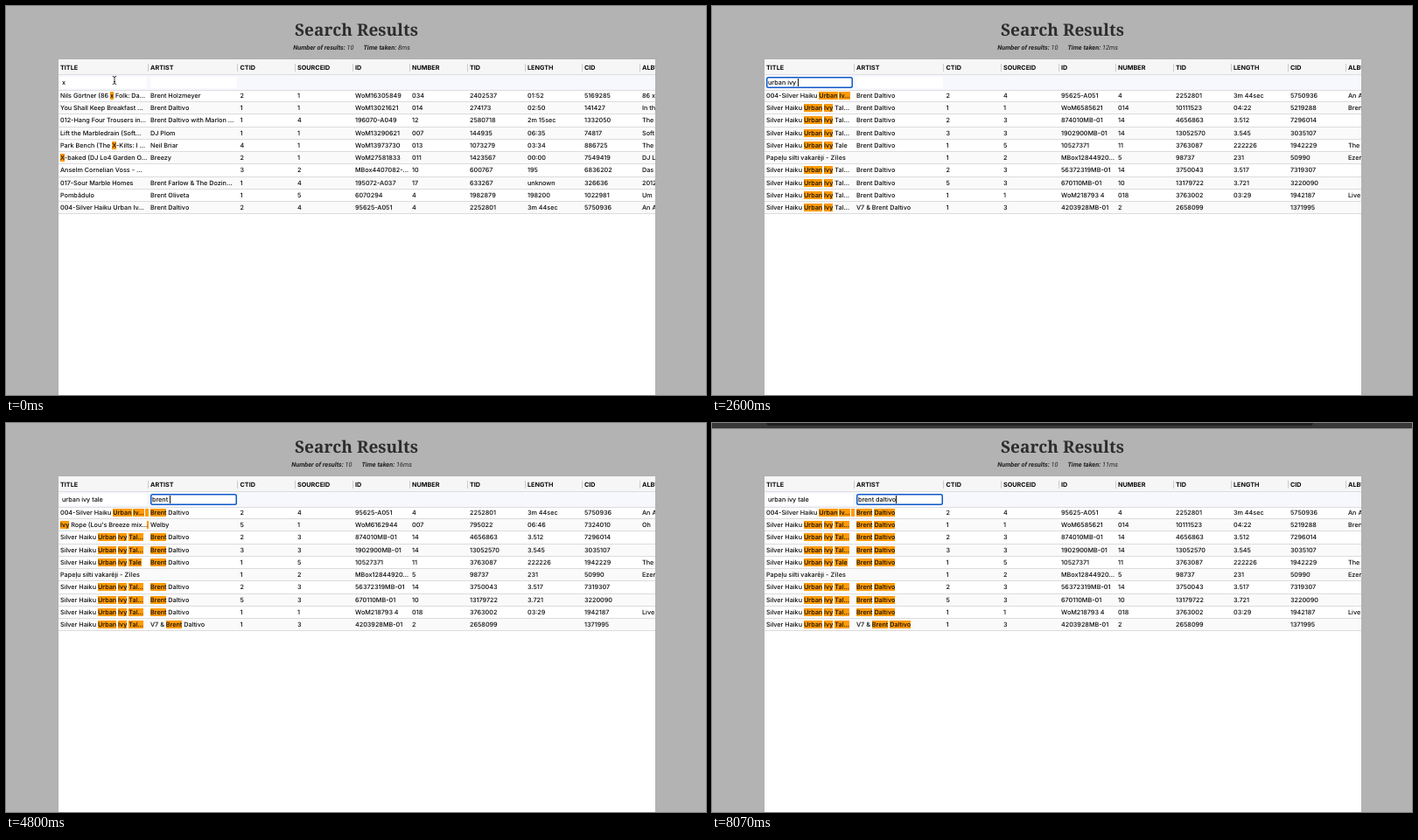
Write an HTML page that moves like this. It is 800x445 px and loops after 8140 ms.

```html
<!DOCTYPE html>
<html lang="en">
<head>
<meta charset="utf-8">
<title>Search Results</title>
<style>
html, body { margin: 0; width: 100%; height: 100%; overflow: hidden; background: #b3b3b3; }
#stage { position: absolute; left: 0; top: 0; width: 800px; height: 445px; overflow: hidden; background: #b3b3b3; text-rendering: geometricPrecision; }
#stage div, #stage span.cell, #stage i { position: absolute; white-space: pre; }
h1 {
  position: absolute; left: 0; top: 13.5px; width: 801px; margin: 0; text-align: center;
  font: 700 19.05px/27.6px "Noto Serif", serif; color: #2d2d2d;
}
#stats {
  left: 0; top: 42px; width: 801px; text-align: center;
  font: italic 400 7.3px/12.6px Roboto, sans-serif; color: #222;
}
#stats b + span { margin-right: 11px; }
#card {
  left: 59.5px; top: 60.5px; width: 682px; height: 400px; overflow: hidden;
  background: #fff; box-shadow: 0 0 0 .6px #aeaeae;
  font: 450 7.22px/13.2px Inter, sans-serif; color: #0a0a0a;
}
#head { left: 0; top: 0; width: 100%; height: 17.5px; background: #f6f6f6; border-bottom: .6px solid #ddd; font-weight: 700; line-height: 19px; }
#head i { top: 5px; width: 1px; height: 9.5px; background: #ccc; }
#filters { left: 0; top: 18px; width: 100%; height: 17px; background: #f6f8fd; border-bottom: .6px solid #ddd; }
.field { top: 2.5px; width: 98.5px; height: 13px; box-sizing: border-box; background: #fff; line-height: 13px; padding-left: 2px; border-radius: 2.5px; }
.field.on { box-shadow: inset 0 0 0 1.5px #0f5ac8; }
.caret { display: inline-block; width: .7px; height: 8.5px; margin-right: -.7px; background: #111; vertical-align: -1.5px; }
.row { left: 0; width: 100%; height: 14.22px; box-sizing: border-box; border-bottom: .7px solid #dcdcdc; }
.row:nth-child(even) { background: #fafafa; }
mark { background: #ff9a05; color: inherit; }
.row i { top: 2.2px; height: 8.8px; background: #ff9a05; }
#beam { position: absolute; left: 120px; top: 79px; }
#bar { left: 0; top: -7px; width: 800px; height: 6px; background: #383838; box-shadow: 0 .5px 1.5px #666; }
#bar i { left: 62px; top: -4px; width: 625px; height: 7px; border-radius: 4px; background: #202020; }
</style>
</head>
<body>
<div id="stage">
  <h1>Search Results</h1>
  <div id="stats"><b>Number of results:</b><span> 10</span><b>Time taken:</b> <span id="ms"></span></div>
  <div id="card">
    <div id="head"></div>
    <div id="filters">
      <div class="field" id="title" style="left:2.5px"></div>
      <div class="field" id="artist" style="left:105.5px"></div>
    </div>
    <div id="rows" style="left:0;top:35.5px;width:100%;height:143px"></div>
  </div>
  <svg id="beam" width="8" height="12"><path d="M1.8 1.5Q4 1.5 4 3V9Q4 10.5 1.8 10.5M6.2 1.5Q4 1.5 4 3M4 9Q4 10.5 6.2 10.5M2.8 7.5H5.2" fill="none" stroke="#222" stroke-width=".9"/></svg>
  <div id="bar"><i></i></div>
</div>
<script>
const LOOP = 8140;
const $ = id => document.getElementById(id);
const colX = [2.5, 105.5, 208, 273.5, 339.5, 404.5, 470.5, 536.5, 601.5, 667.5];
const heads = 'TITLE ARTIST CTID SOURCEID ID NUMBER TID LENGTH CID ALBUM'.split(' ');

// * and @ stand for the recurring title and artist
const records = `Nils Görtner (86 x Folk: Da…|Brent Holzmeyer|2|1|WoM16305849|034|2402537|01:52|5169285|86 x
You Shall Keep Breakfast …|@|1|1|WoM13021621|014|274173|02:50|141427|In th
012-Hang Four Trousers in…|@ with Marlon …|1|4|196070-A049|12|2580718|2m 15sec|1332050|The
Lift the Marbledrain (Soft…|DJ Plom|1|1|WoM13290621|007|144935|06:35|74817|Soft
Park Bench (The X-Kilts: I …|Neil Briar|4|1|WoM13973730|013|1073279|03:34|886725|The
X-baked (DJ Lo4 Garden O…|Breezy|2|1|WoM27581833|011|1423567|00:00|7549419|DJ L
Anselm Cornelian Voss - …||3|2|MBox4407082-…|10|600767|195|6836202|Das
017-Sour Marble Homes|Brent Farlow & The Dozin…|1|4|195072-A037|17|633267|unknown|326636|2012
Pombâdulo|Brent Oliveta|1|5|6070294|4|1982879|198200|1022981|Um
004-Silver Haiku Urban Iv…|@|2|4|95625-A051|4|2252801|3m 44sec|5750936|An A
001-SnowPea Farm|Brent Mokko|1|4|7044-A019|1|1801708|3m 2sec|929494|Yes
A Lid Belongs on You (The…|@|1|1|WoM2188132|004|2050545|02:03|1057881|The
An Owl Even Sails Yo u- A …|@|2|3|5499754MB-01|A7|2815720|3.483|4891480|
Two Chivalrous Fir Trees|@|1|5|15266078|7|2479786|151000|1279750|The(
*…|@|1|1|WoM6585621|014|10111523|04:22|5219288|Bren
*…|@|2|3|874010MB-01|14|4656863|3.512|7296014|
*…|@|3|3|1902900MB-01|14|13052570|3.545|3035107|
*e|@|1|5|10527371|11|3763087|222226|1942229|The
Papeļu silti vakarēji - Zīles||1|2|MBox12844920…|5|98737|231|50990|Ezer
*…|@|2|3|56372319MB-01|14|3750043|3.517|7319307|
*…|@|5|3|670110MB-01|10|13179722|3.721|3220090|
*…|@|1|1|WoM218793 4|018|3763002|03:29|1942187|Live
*…|V7 & @|1|3|4203928MB-01|2|2658099||1371995|
Ivy Rope (Lou's Breeze mix…|Welby|5|1|WoM6162944|007|795022|06:46|7324010|Oh`
  .replaceAll('*', 'Silver Haiku Urban Ivy Tal').replaceAll('@', 'Brent Daltivo')
  .split('\n').map(line => line.split('|'));

const span = (from, n) => Array.from({ length: n }, (_, i) => from + i);
const byX = span(0, 10);
const byU = [1, 2, 10, 11, 7, 8, 0, 9, 12, 13];
const byTitle = [9, ...span(14, 9)];
const byArtist = [9, 23, ...span(15, 8)];
// clipped end of a highlighted word: left, width
const slivers = { 9: [99, 4], 23: [101.8, 1.4] };

// [time, row list, search ms]
const results = [
  [0, byX, 8], [1200, byU, 9], [2030, byTitle, 12],
  [3300, byTitle, 15], [4130, byArtist, 16], [5600, byTitle, 11]
];

// typing: [time, text]
const type = (start, step, before, added) =>
  [...added].map((_, i) => [start + i * step, before + added.slice(0, i + 1)]);
const titleKeys = [
  [0, 'x'], [1000, ''], [1130, 'u'],
  ...type(1820, 80, 'u', 'rban ivy '),
  ...type(2870, 130, 'urban ivy ', 'tale')
];
const artistKeys = [
  [0, ''],
  ...type(3930, 140, '', 'brent '),
  ...type(5330, 220, 'brent ', 'daltivo')
];
const TITLE_FOCUS = 270, ARTIST_FOCUS = 3600;

const last = (list, t) => list.filter(k => k[0] <= t).pop();

function highlight(text, query) {
  const words = query.trim().split(' ').filter(Boolean);
  if (!words.length) return text;
  const edge = query.length > 1 ? '\\b' : '';
  const forms = words.flatMap(w => w.length > 2 ? [w, w.slice(0, -1) + '…'] : [w]);
  return text.replace(new RegExp(edge + '(' + forms.join('|') + ')', 'gi'), '<mark>$1</mark>');
}

const cell = (html, i) => `<span class="cell" style="left:${colX[i]}px">${html}</span>`;

function rowHtml(id, n, title, artist) {
  const cells = records[id].map((text, i) =>
    cell(i === 0 ? highlight(text, title) : i === 1 ? highlight(text, artist) : text, i));
  const bit = title.endsWith('tale') && slivers[id];
  const extra = bit ? `<i style="left:${bit[0]}px;width:${bit[1]}px"></i>` : '';
  return `<div class="row" style="top:${n * 14.22}px">${extra}${cells.join('')}</div>`;
}

function setField(id, text, focused, since) {
  const caret = focused && since % 1000 < 500 ? '<span class="caret"></span>' : '';
  const html = text + caret;
  const el = $(id);
  el.classList.toggle('on', focused);
  if (el.dataset.html !== html) el.innerHTML = el.dataset.html = html;
}

$('head').innerHTML = heads.map(cell).join('') +
  colX.slice(1).map(x => `<i style="left:${x - 3.3}px"></i>`).join('');

let shown = '';
function draw(t) {
  const [titleAt, title] = last(titleKeys, t);
  const [artistAt, artist] = last(artistKeys, t);
  const [at, ids, ms] = last(results, t);
  const inArtist = t >= ARTIST_FOCUS;
  setField('title', title, t >= TITLE_FOCUS && !inArtist, t - Math.max(titleAt, TITLE_FOCUS));
  setField('artist', artist, inArtist, t - Math.max(artistAt, ARTIST_FOCUS));

  const key = [at, title, artist].join('|');
  if (key !== shown) {
    shown = key;
    $('ms').textContent = ms + 'ms';
    $('rows').innerHTML = ids.map((id, n) => rowHtml(id, n, title, artist)).join('');
  }
  $('beam').style.display = t < 1000 ? '' : 'none';
  const slide = Math.min(1, Math.max(0, (t - 7530) / 250));
  $('bar').style.transform = `translateY(${slide * 7}px)`;
  $('bar').style.visibility = slide ? 'visible' : 'hidden';
}

const begin = performance.now();
function tick() {
  draw((performance.now() - begin) % LOOP);
  requestAnimationFrame(tick);
}
tick();
</script>
</body>
</html>
```
